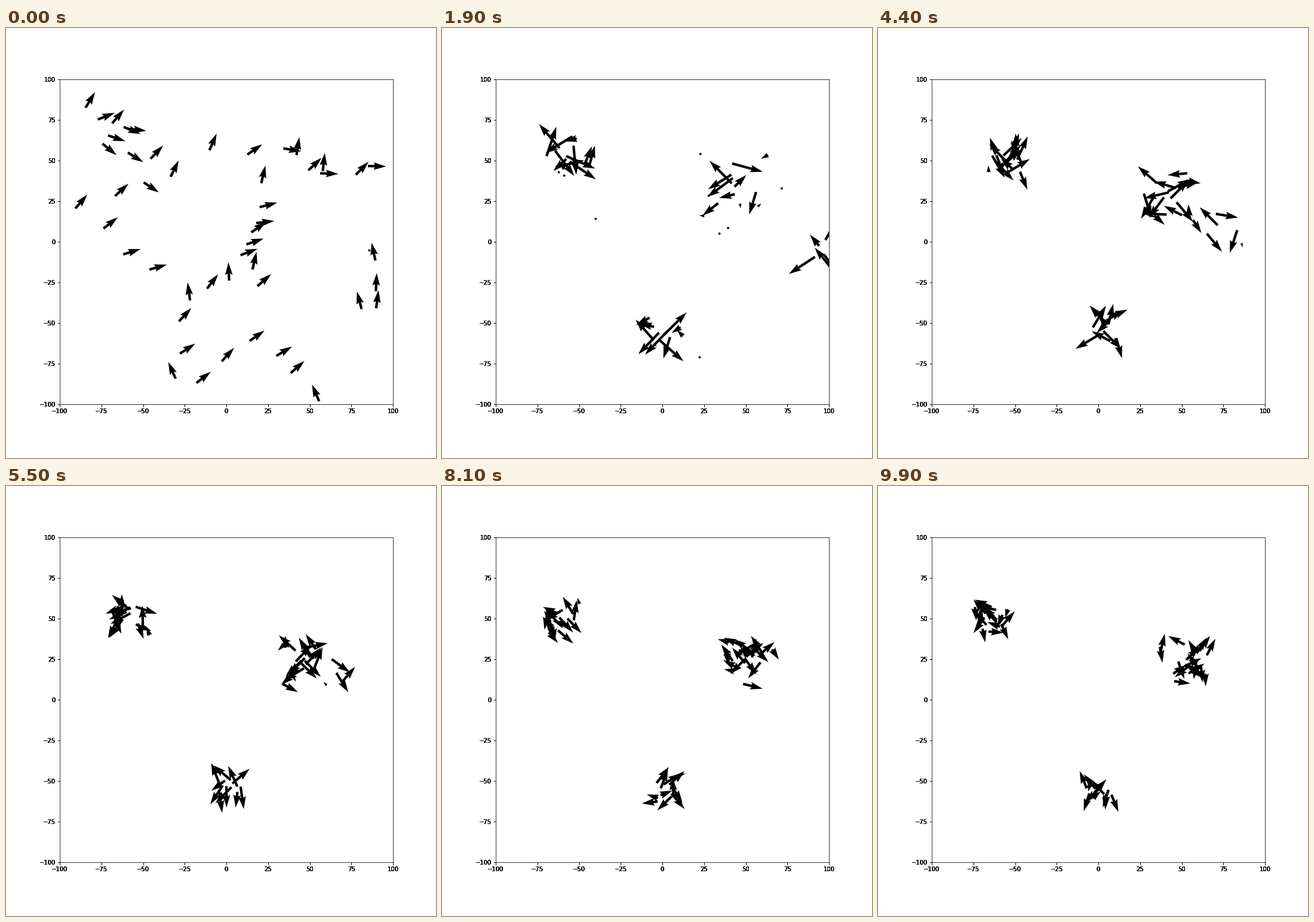
A matplotlib script for the animation above (10000 ms loop, 720x720 px).

```python
import numpy as np
import matplotlib.pyplot as plt
from matplotlib.animation import FuncAnimation

FRAMES = 100
STEP_MS = 100
LABEL_LAYERS = 6
START_LEN = 30.5  # arrow length in pixels

# Each flock: size, start path, heading range, centre at each key time, radius.
KEY_TIMES = [19, 33, 55, 99]
FLOCKS = [
    (16, [(-83, 80), (-60, 72), (-72, 62), (-32, 42), (-88, 18), (-48, -18)],
     (-40, 75), [(-59, 57), (-58, 52), (-57, 50), (-62, 49)], 12),
    (12, [(0, -22), (-26, -45), (-29, -95), (18, -58), (53, -98)],
     (30, 120), [(1, -56), (0, -53), (3, -54), (1, -56)], 9),
    (17, [(-12, 55), (38, 58), (52, 40), (90, 46), (18, 33), (20, 9),
          (10, -8), (18, -27)],
     (-10, 100), [(44, 35), (41, 28), (45, 24), (52, 25)], 14),
    (5, [(83, -44), (95, -40), (89, -16), (86, -7)],
     (80, 105), [(88, -4), (84, 6), (62, 18), (52, 25)], 11),
]

rng = np.random.default_rng(12)


def along(path, n, at=None):
    """Points on a polyline, evenly spaced or at given positions."""
    knots = np.arange(len(path)) if at is None else at
    where = np.linspace(knots[0], knots[-1], n)
    return np.column_stack([np.interp(where, knots, c) for c in zip(*path)])


sizes = [f[0] for f in FLOCKS]
flock = np.repeat(np.arange(len(FLOCKS)), sizes)
count = len(flock)

start = np.vstack([along(path, n) for n, path, *_ in FLOCKS])
start += rng.uniform(-3, 3, (count, 2))
heading = np.radians(np.concatenate(
    [rng.uniform(*turn, n) for n, _, turn, *_ in FLOCKS]))
launch = START_LEN * np.column_stack([np.cos(heading), np.sin(heading)])
launch[-1] = 0  # one bird begins at rest

radius = np.array([f[4] for f in FLOCKS])[flock] * rng.uniform(0.3, 1.1, count)
spin = rng.uniform(0.13, 0.3, (count, 2)) * rng.choice([-1, 1], (count, 1))
phase = rng.uniform(0, 2 * np.pi, (count, 2))


def centres(t):
    """Centre of each bird's flock at time t."""
    points = [[np.interp(t, KEY_TIMES, c) for c in zip(*f[3])] for f in FLOCKS]
    return np.array(points)[flock]


distance = np.hypot(*(start - centres(0)).T)
travel = 8 + 0.45 * distance * rng.uniform(0.6, 1.3, count)


def state(t):
    """Positions in data units and arrows in pixels."""
    u = np.clip(t / travel, 0, 1)[:, None]
    ease = u * u * (3 - 2 * u)
    angle = spin * t + phase
    spread = np.interp(t, [19, 55], [1.25, 1])
    circling = centres(t) + spread * radius[:, None] * np.cos(angle)
    pos = (1 - ease) * (start + 0.03 * t * launch) + ease * circling

    # Arrows fade while travelling and grow again inside the flock.
    sway = -np.sin(angle) * np.sign(spin)
    sway /= np.maximum(1, np.hypot(*sway.T))[:, None]
    top = np.interp(t, KEY_TIMES, [53, 47, 38, 31])
    arrive = np.clip((u - 0.6) / 0.4, 0, 1)
    return pos, launch * max(0, 1 - t / 12) + arrive * top * sway


fig = plt.figure(figsize=(10, 10), dpi=72, facecolor="white")
fig.subplots_adjust(left=0.125, right=0.9, bottom=0.125, top=0.88)
# Stacked axes give the heavy tick labels.
for layer in range(LABEL_LAYERS):
    ax = fig.add_subplot(frameon=layer == LABEL_LAYERS - 1)
    ax.patch.set_visible(False)
    ticks = range(-100, 101, 25)
    ax.set(xlim=(-100, 100), ylim=(-100, 100), xticks=ticks, yticks=ticks)

pos, arrow = state(0)
quiver = ax.quiver(*pos.T, *arrow.T, color="black", units="width",
                   width=0.0075, scale=1, scale_units="dots", angles="uv")


def update(n):
    pos, arrow = state(n)
    quiver.set_offsets(pos)
    quiver.set_UVC(*arrow.T)
    return quiver,


anim = FuncAnimation(fig, update, frames=FRAMES, interval=STEP_MS,
                     repeat=True, repeat_delay=0, blit=False)
plt.show()
```
